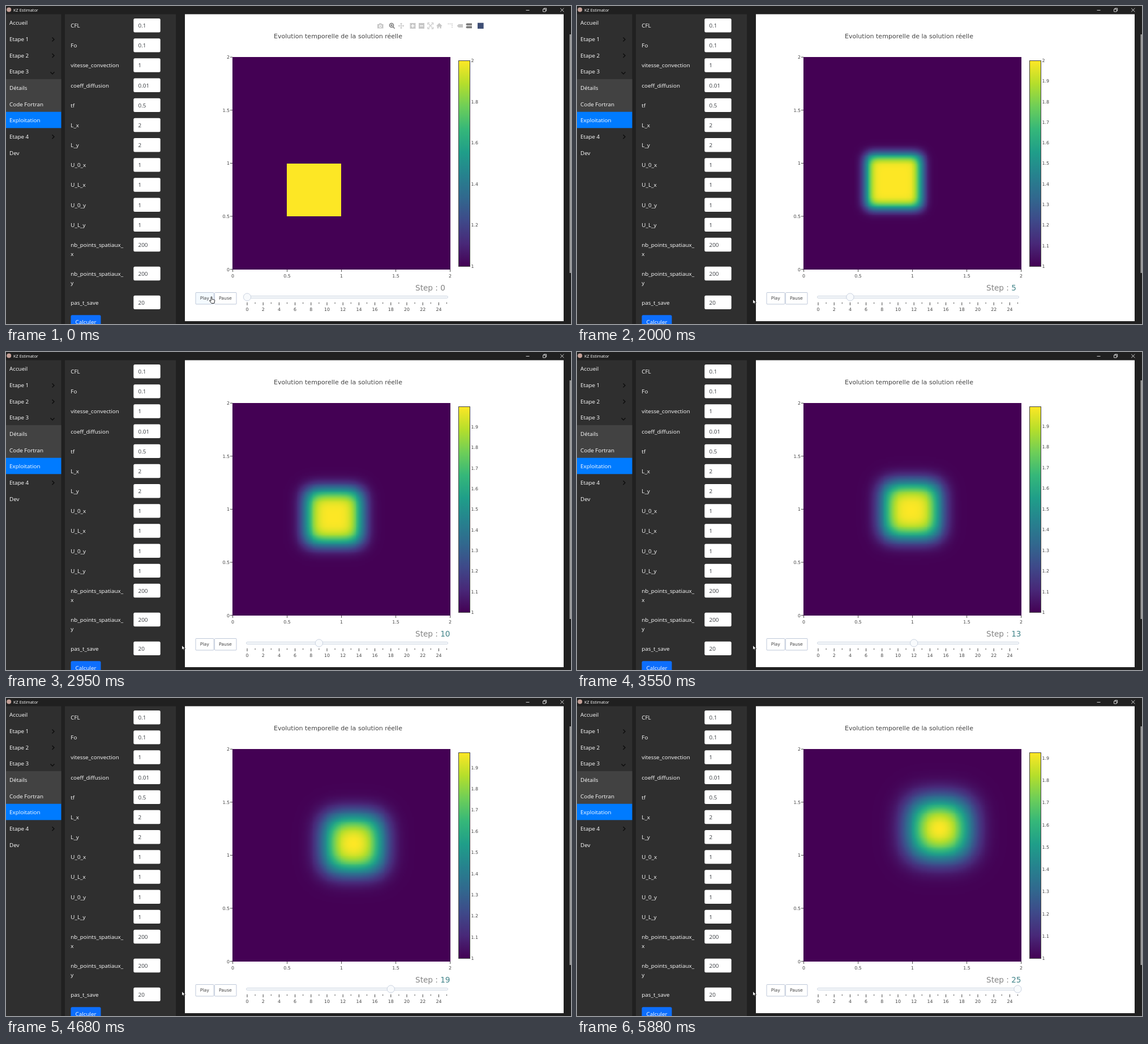
An HTML page with a canvas for the animation above (6610 ms loop, 998x561 px).

```html
<!DOCTYPE html>
<html lang="fr">
<head>
<meta charset="utf-8">
<title>KZ Estimator</title>
<style>
html, body { margin: 0; width: 100%; height: 100%; overflow: hidden; background: #202020; }
svg { position: absolute; left: 0; top: 0; }
canvas { position: absolute; left: 400px; top: 90px; }
text { white-space: pre; }
.ui { font: 9.85px "Open Sans", "Noto Sans", sans-serif; fill: #fff; }
.val { fill: #34383c; }
.plot { font: 7.9px "DejaVu Sans", Verdana, sans-serif; fill: #444; }
.title { font-size: 11.05px; }
.btn { font-size: 7.75px; }
.step { font-size: 13.6px; fill: #858585; }
.mid { text-anchor: middle; }
.end { text-anchor: end; }
</style>
</head>
<body>
<svg id="stage" width="998" height="561" viewBox="0 0 998 561">
  <defs><linearGradient id="viridis" x1="0" y1="1" x2="0" y2="0"></linearGradient></defs>

  <circle cx="5.2" cy="6.6" r="4" fill="#c4a097"/>
  <text class="ui" x="13" y="9.8" style="font-size:7.4px">KZ Estimator</text>
  <g fill="none" stroke="#e4e4e4" stroke-width=".9">
    <path d="M918.5 7.5h6M979.2 4l6.2 6.2M985.4 4l-6.2 6.2"/>
    <path d="M948.5 5.5h4.5v4.5h-4.5zM950 5.300v-1.300h4.600v4.600h-1.300"/>
  </g>

  <rect y="14.500" width="97.500" height="547" fill="#2f2f2f"/>
  <rect y="129" width="97.500" height="58" fill="#424242"/>
  <rect y="186.700" width="97.500" height="28.600" fill="#007bff"/>
  <rect x="104" y="14.500" width="196" height="547" fill="#2f2f2f"/>
  <rect x="316" y="14.500" width="669" height="541.500" fill="#fff"/>
  <rect x="995.500" y="50" width="2.500" height="421" fill="#9a9a9a"/>
  <g id="menu"></g>
  <g id="form"></g>
  <rect x="114.500" y="545.300" width="53" height="24" rx="2.500" fill="#0d6efd"/>
  <text class="ui mid" x="141" y="560.800">Calculer</text>

  <g id="bar" fill="#c7c7c7" stroke="none">
    <path fill-rule="evenodd" d="M656 32h2.500l1-1.500h3.500l1 1.500h2.500v7.500h-10.500zM661.200 33a2.600 2.600 0 1 0 .01 0zM661.200 34.300a1.300 1.300 0 1 1-.01 0z"/>
    <g fill="none" stroke="#7a7a7a" stroke-width="1.600">
      <circle cx="681" cy="34" r="3.500"/><path d="M683.600 36.700l3 3M679.300 34h3.400M681 32.300v3.400"/>
    </g>
    <path d="M698 29.500l2 2.500h-1.400v2.400h2.400v-1.400l2.300 2-2.300 2v-1.400h-2.400v2.400h1.400l-2 2.500-2-2.500h1.400v-2.400h-2.400v1.400l-2.300-2 2.300-2v1.400h2.400v-2.400h-1.400z"/>
    <path fill-rule="evenodd" d="M713.500 30h10v10h-10zM717.700 32v2.200h-2.200v1.600h2.200v2.200h1.600v-2.200h2.200v-1.600h-2.200v-2.200z"/>
    <path fill-rule="evenodd" d="M729 30h10v10h-10zM731 34.200v1.600h6v-1.600z"/>
    <path fill="none" stroke="#c7c7c7" stroke-width="1.300" d="M745 33v-3h3M751.500 30h3v3M754.500 37v3h-3M748 40h-3v-3M746.800 32l6 6M752.800 32l-6 6"/>
    <path d="M765.300 30l5.200 5-.8.800-.9-.800v4.500h-2.500v-3h-2v3h-2.500v-4.500l-.9.800-.8-.8z"/>
    <path fill="none" stroke="#c7c7c7" stroke-width="1.500" stroke-dasharray="1.800 1.300" d="M780.500 31.500h7.500v8"/>
    <path d="M796.500 35l3-3h7.500v6h-7.500z"/>
    <path fill="#7a7a7a" d="M812.500 32l1.300-1.500h9.200v3.800h-9.200l-1.300-1.300zM812.500 37l1.300-1.500h9.200v3.800h-9.200l-1.300-1.300z"/>
    <rect x="833" y="29.700" width="10.600" height="10.400" fill="#3f4f75"/>
  </g>

  <text class="plot title" x="473" y="57">Evolution temporelle de la solution réelle</text>
  <g id="axes"></g>
  <rect x="799.500" y="96.500" width="20" height="363" fill="url(#viridis)" stroke="#444" stroke-width="1"/>
  <g id="scale"></g>

  <text class="plot step" x="723" y="501.500">Step : <tspan id="count">0</tspan></text>
  <g stroke="#bec8d9">
    <rect id="play" x="335" y="505.500" width="32" height="20.500" rx="1" fill="#fff"/>
    <rect x="368.500" y="505.500" width="38.500" height="20.500" rx="1" fill="#fff"/>
    <rect x="424.500" y="511.700" width="356" height="3.600" rx="1.800" fill="#f8fafc" stroke-width=".8"/>
    <circle id="grip" cx="426" cy="513.500" r="6.600" fill="#f8fafc" stroke-width=".8"/>
  </g>
  <text class="plot btn mid" x="350.800" y="517.700">Play</text>
  <text class="plot btn mid" x="387.300" y="517.700">Pause</text>
  <g id="ticks"></g>

  <g fill="#fff" stroke="#000" stroke-width=".8" stroke-linejoin="round">
    <path id="hand" d="M1 .8q0-1 .9-1t.9 1v3.600l4 .8q1 .3 1 1.300l-.7 3.500-.7 1.500h-4.400l-3.500-4.300q-.4-1 .6-1.100l1.900 1.400z"/>
    <path id="arrow" d="M0 0v8.200l1.900-1.700 1.300 2.800 1.300-.6-1.300-2.700h2.600z"/>
  </g>
</svg>
<canvas id="heat" width="385" height="375"></canvas>

<script>
const LOOP = 6610, W = 385, H = 375, CELLS = 200, SPAN = 2;
const DIFFUSION = 0.0145, DT = 0.02, LAST = 25;
const VIRIDIS = ['440154', '482878', '3e4989', '31688e', '26828e', '1f9e89', '35b779', '6ece58', 'b5de2b', 'fde725'];
// start of solution steps 1 to 25
const STEP_AT = [1390, 1590, 1800, 2000, 2200, 2400, 2600, 2800, 2950, 3150, 3350, 3550, 3750,
  3880, 4150, 4280, 4410, 4680, 4830, 4960, 5220, 5350, 5550, 5750, 5880];
const COUNT_START = 1170, LEAVE_PLAY = 1240;
// time, x, y
const POINTER = [[0, 361, 513], [820, 357, 511], [890, 351, 508], [960, 345, 505], [1100, 341, 508],
  [1170, 336, 511], [1240, 330, 513], [1310, 325, 514], [1390, 321.7, 514.7], [1450, 318, 516],
  [1520, 314, 517], [1590, 310.7, 517.3]];
const BAR = [[0, 1], [1660, 0.75], [1730, 0.4], [1800, 0.12], [1870, 0]];

const $ = id => document.getElementById(id);
const at = (rows, t) => rows.filter(r => r[0] <= t).pop();

function add(parent, tag, attrs, text) {
  const el = document.createElementNS('http://www.w3.org/2000/svg', tag);
  for (const k in attrs) el.setAttribute(k, attrs[k]);
  if (text !== undefined) el.textContent = text;
  parent.appendChild(el);
  return el;
}
const label = (parent, cls, x, y, text) => add(parent, 'text', { class: cls, x, y }, text);
const line = (parent, d, w = 1) => add(parent, 'path', { d, stroke: '#444', 'stroke-width': w, fill: 'none' });

function buildMenu() {
  const g = $('menu');
  const names = ['Accueil', 'Etape 1', 'Etape 2', 'Etape 3', 'Détails', 'Code Fortran', 'Exploitation', 'Etape 4', 'Dev'];
  names.forEach((name, i) => {
    const y = 29.8 + i * 28.65;
    label(g, 'ui', 6, y + 3.6, name);
    if (!name.startsWith('Etape')) return;
    const d = i === 3 ? `M78.500 ${y + 0.8}l3.500 3.500 3.500-3.500` : `M81.500 ${y - 3}l3.500 3.500-3.500 3.500`;
    add(g, 'path', { d, fill: 'none', stroke: '#0c0c0c', 'stroke-width': 1.4 });
  });
}

function buildForm() {
  const g = $('form');
  const fields = [['CFL', '0.1'], ['Fo', '0.1'], ['vitesse_convection', 1], ['coeff_diffusion', '0.01'], ['tf', '0.5'],
    ['L_x', 2], ['L_y', 2], ['U_0_x', 1], ['U_L_x', 1], ['U_0_y', 1], ['U_L_y', 1],
    ['nb_points_spatiaux_ x', 200], ['nb_points_spatiaux_ y', 200], ['pas_t_save', 20]];
  let y = 34.2;
  for (const [name, value] of fields) {
    const parts = name.split(' ');
    parts.forEach((p, i) => label(g, 'ui', 114.3, y + 3.8 + i * 15.8, p));
    add(g, 'rect', { x: 225.3, y: y - 12.2, width: 47.4, height: 24.4, rx: 2.5, fill: '#fff' });
    label(g, 'ui val', 233.6, y + 3.8, value);
    y += parts.length > 1 ? 50.9 : 35.17;
  }
}

function buildPlot() {
  const axes = $('axes'), ticks = $('ticks');
  for (let i = 0; i <= 4; i++) {
    const x = 400.6 + i * 96, y = 464.6 - i * 93.6;
    line(axes, `M${x} 465v4M396 ${y}h4`);
    label(axes, 'plot mid', x, 479, i / 2);
    label(axes, 'plot end', 395, y + 2.9, i / 2);
  }
  for (let i = 0; i <= LAST; i++) {
    const x = 426 + i * 14.1, major = i % 2 === 0;
    line(ticks, `M${x} 522.800v${major ? 5.2 : 2.6}`, major ? 1 : 0.9);
    if (major) label(ticks, 'plot mid', x, 538, i);
  }
  VIRIDIS.forEach((c, i) => add($('viridis'), 'stop', { offset: i / 9, 'stop-color': '#' + c }));
}

const rgb = VIRIDIS.map(c => [0, 2, 4].map(i => parseInt(c.slice(i, i + 2), 16)));
const palette = Array.from({ length: 512 }, (_, i) => {
  const p = i / 511 * 9, n = Math.min(8, Math.floor(p));
  return rgb[n].map((c, j) => Math.round(c + (rgb[n + 1][j] - c) * (p - n)));
});

function erf(x) {
  const a = Math.abs(x), u = 1 / (1 + 0.3275911 * a);
  const poly = ((((1.061405429 * u - 1.453152027) * u + 1.421413741) * u - 0.284496736) * u + 0.254829592) * u;
  return Math.sign(x) * (1 - poly * Math.exp(-a * a));
}

// Diffused unit pulse, initially on [0.5, 1], carried at speed 1.
function pulse(x, t) {
  const s = 2 * Math.sqrt(DIFFUSION * t) + 1e-6;
  return (erf((x - 0.5 - t) / s) + erf((1 + t - x) / s)) / 2;
}

const ctx = $('heat').getContext('2d');
const img = ctx.createImageData(W, H);

function drawHeat(t, peak) {
  const profile = n => Array.from({ length: n }, (_, i) =>
    Math.max(0, pulse((Math.floor((i + 0.5) / n * CELLS) + 0.5) * SPAN / CELLS, t)));
  const fx = profile(W), fy = profile(H).reverse();
  let o = 0;
  for (let j = 0; j < H; j++) {
    for (let i = 0; i < W; i++) {
      const c = palette[Math.min(511, Math.round(fx[i] * fy[j] / peak * 511))];
      img.data[o++] = c[0];
      img.data[o++] = c[1];
      img.data[o++] = c[2];
      img.data[o++] = 255;
    }
  }
  ctx.putImageData(img, 0, 0);
}

function drawScale(k, peak) {
  const g = $('scale');
  g.textContent = '';
  for (let i = 0; i <= 10; i += k < 2 ? 2 : 1) {
    if (i / 10 > peak + 1e-4) break;
    label(g, 'plot', 821.5, 462 - i / 10 / peak * 363, 1 + i / 10);
  }
}

let shown = -1;
function showStep(k) {
  if (k === shown) return;
  shown = k;
  const t = k * DT, peak = pulse(0.75 + t, t) ** 2;
  drawHeat(t, peak);
  drawScale(k, peak);
  $('grip').setAttribute('cx', 426 + k * 14.1);
}

function render(t) {
  const k = STEP_AT.filter(s => s <= t).length;
  showStep(k);
  const count = t < COUNT_START ? 0 : Math.min(LAST, k + 1);
  $('count').textContent = count;
  $('count').style.fill = count ? '#43858a' : '';
  const [, x, y] = at(POINTER, t), over = t < LEAVE_PLAY;
  for (const id of ['hand', 'arrow']) {
    $(id).setAttribute('transform', `translate(${x} ${y})`);
    $(id).style.display = (id === 'hand') === over ? '' : 'none';
  }
  $('play').setAttribute('fill', over ? '#f4faff' : '#fff');
  $('bar').setAttribute('opacity', at(BAR, t)[1]);
}

buildMenu();
buildForm();
buildPlot();
const start = performance.now();
function tick() {
  render((performance.now() - start) % LOOP);
  requestAnimationFrame(tick);
}
tick();
</script>
</body>
</html>
```
